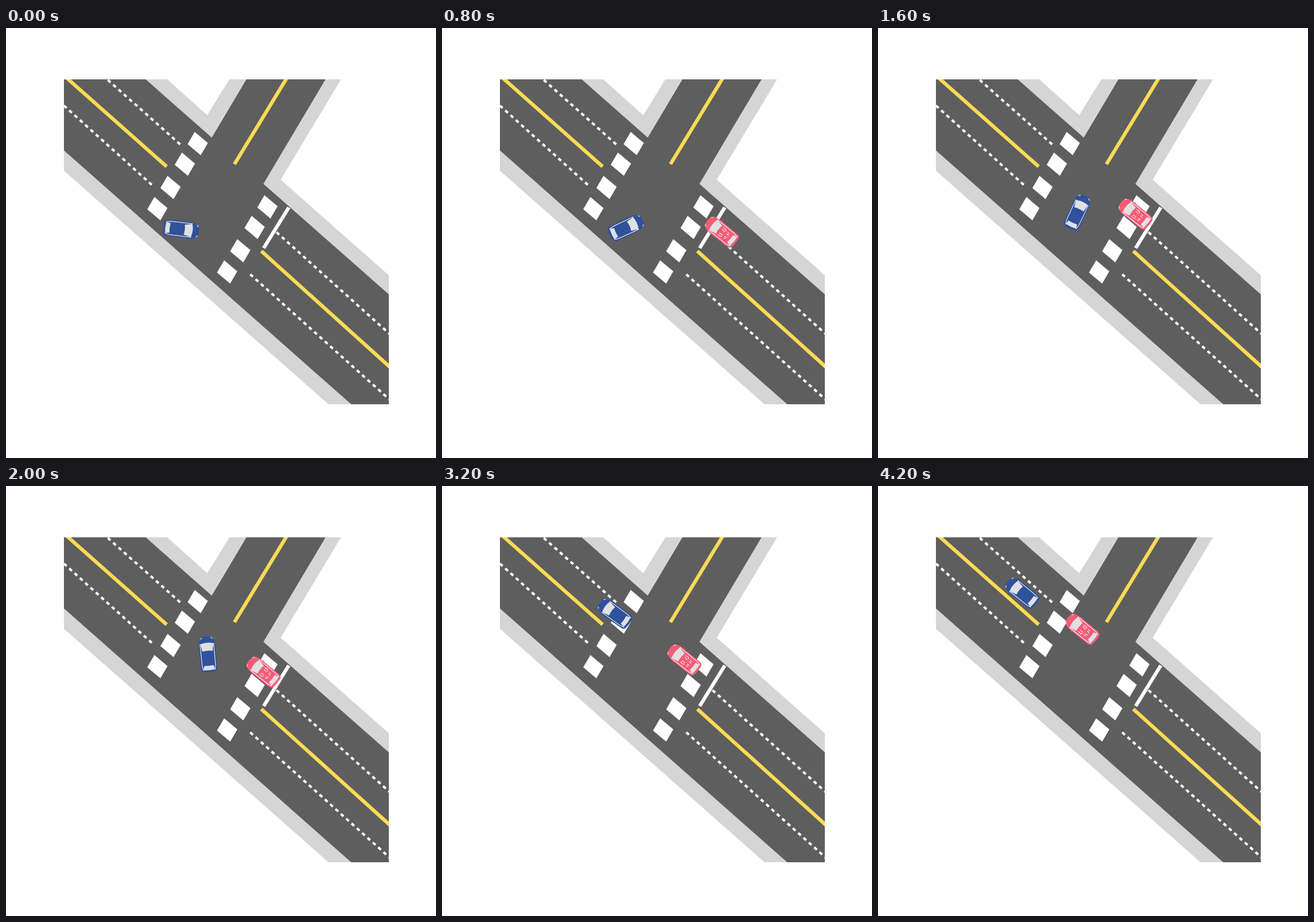
An HTML page for the animation above (4.4 s loop, 720 by 720 pixels).

```html
<!DOCTYPE html>
<html lang="en">
<head>
<meta charset="utf-8">
<title>Turning at a junction</title>
<style>
  html, body { margin: 0; width: 100%; height: 100%; overflow: hidden; background: #fff; }
  svg { display: block; width: 100vw; height: 100vh; }
  .kerb { fill: #d5d5d5; }
  .road { fill: #5e5e5e; }
  .seam { stroke: #e1e1e1; stroke-width: .8; }
  .mid { stroke: #fddb55; stroke-width: 6; }
  .lane { stroke: #fff; stroke-width: 4; stroke-dasharray: 6 6; }
  .glass { fill: #e0e0e2; }
  .trim { fill: none; stroke: #fff; stroke-width: 1; stroke-linejoin: round; }
  .lamp { fill: #fff; }
</style>
</head>
<body>
<svg viewBox="0 0 720 720">
  <defs>
    <clipPath id="view"><rect x="97" y="86" width="544" height="544"/></clipPath>
    <path id="block" fill="#fff" d="M-5-19.5 17-1 5 19.5-17 1z"/>
    <g id="walk">
      <use href="#block" x="321" y="193.5"/>
      <use href="#block" x="299.5" y="228"/>
      <use href="#block" x="275.5" y="267"/>
      <use href="#block" x="253.5" y="302.5"/>
    </g>
    <g id="car">
      <path d="M-24-13.5 14-13.8Q26-13.2 29-7.5Q31 0 29 7.5Q26 13.2 14 13.8L-24 13.5Q-29 13-30 8.5Q-31 0-30-8.5Q-29-13-24-13.5z"/>
      <path d="M8-13 11-15.2 13-13zM8 13 11 15.2 13 13z"/>
      <path class="lamp" d="M24.5-11.5 28.5-8 27.5-7zM24.5 11.5 28.5 8 27.5 7z"/>
      <path class="trim" d="M18-11.5-20-11.2-27-9.5M18 11.5-20 11.2-27 9.5"/>
      <path class="glass" d="M5-8.5Q7 0 5 8.500L17.500 11Q21 0 17.500-11z"/>
      <path class="glass" d="M-19-8-26-9.500Q-28 0-26 9.500L-19 8Q-20 0-19-8z"/>
    </g>
  </defs>

  <g clip-path="url(#view)">
    <path class="kerb" d="M97 86H270L337 146 374 86H561L460 254 641 414V630H540L97 239z"/>
    <path class="seam" d="M402 86 352 168M443 242 464 258"/>
    <path class="road" d="M97 86H234L344.5 183.5 402.5 86H535L431 261 641 446V630H578L97 205z"/>
    <path class="mid" d="M97 79.5 269 232M427.500 373.500 647 571.500M472.500 80 382.500 228"/>
    <path class="lane" d="M170.500 87 292.500 195.500M97 130 248.500 266.500"/>
    <path class="lane" d="M453 342 647 516.500M409 412.500 647 626.500"/>
    <use href="#walk"/>
    <use href="#walk" x="116.800" y="106"/>
    <path stroke="#fff" stroke-width="6" d="M473.500 300.500 431.500 368.500"/>
  </g>

  <g id="red" fill="#f45b76">
    <use href="#car"/>
    <path class="trim" d="M2-7-3-7.500M1-4-5-3M-3-8-6-5M2 7-3 7.500M1 4-5 3M-3 8-6 5M-9-6-13-5M-9-3-14-2M-9 6-13 5M-9 3-14 2"/>
  </g>
  <g id="blue" fill="#30519b"><use href="#car"/></g>
</svg>
<script>
const STEP = 200;
const LOOP = 4400;
const KEY_GAP = 3;    // steps between key poses
const TURN_END = 18;
const LANE_SLOPE = 0.805;
const LANE_ANGLE = -141;

// Key poses of the U-turn: x, y, heading
const turn = [
  [293.5, 337, 7], [304, 335.5, -19], [319.5, 327.5, -38], [338.5, 296, -80],
  [328.5, 252, -124], [302, 223.5, -138], [264, 194.5, -154]
];

const blue = document.getElementById("blue");
const red = document.getElementById("red");

function place(car, [x, y, angle]) {
  car.setAttribute("transform", `translate(${x} ${y}) rotate(${angle})`);
}

// Catmull-Rom spline through the key poses
function spline(keys, u) {
  const n = Math.min(Math.floor(u), keys.length - 2);
  const t = u - n;
  const key = k => keys[Math.max(0, Math.min(k, keys.length - 1))];
  return keys[n].map((b, axis) => {
    const a = key(n - 1)[axis], c = key(n + 1)[axis], d = key(n + 2)[axis];
    return b + t / 2 * (c - a + t * (2 * a - 5 * b + 4 * c - d + t * (3 * (b - c) + d - a)));
  });
}

function alongLane(x, y, dist) {
  return [x - dist, y - dist * LANE_SLOPE, LANE_ANGLE];
}

// Turns around, then follows the lane.
function bluePose(i) {
  return i <= TURN_END ? spline(turn, i / KEY_GAP) : alongLane(261, 194.5, 10 * (i - 19));
}

// Brakes evenly to a stop, waits, then rolls on.
function redPose(i) {
  const braking = 9.35 * Math.max(0, 6 - i) ** 2;
  const rolling = i < 16 ? 0 : 12.7 * (i - 14);
  return alongLane(430.3, 310.7, rolling - braking);
}

function draw(time) {
  const i = Math.floor((time % LOOP) / STEP);
  place(blue, bluePose(i));
  place(red, redPose(i));
  red.style.display = i < 2 ? "none" : "";
}

const start = performance.now();
function tick() {
  draw(performance.now() - start);
  requestAnimationFrame(tick);
}
tick();
</script>
</body>
</html>
```
